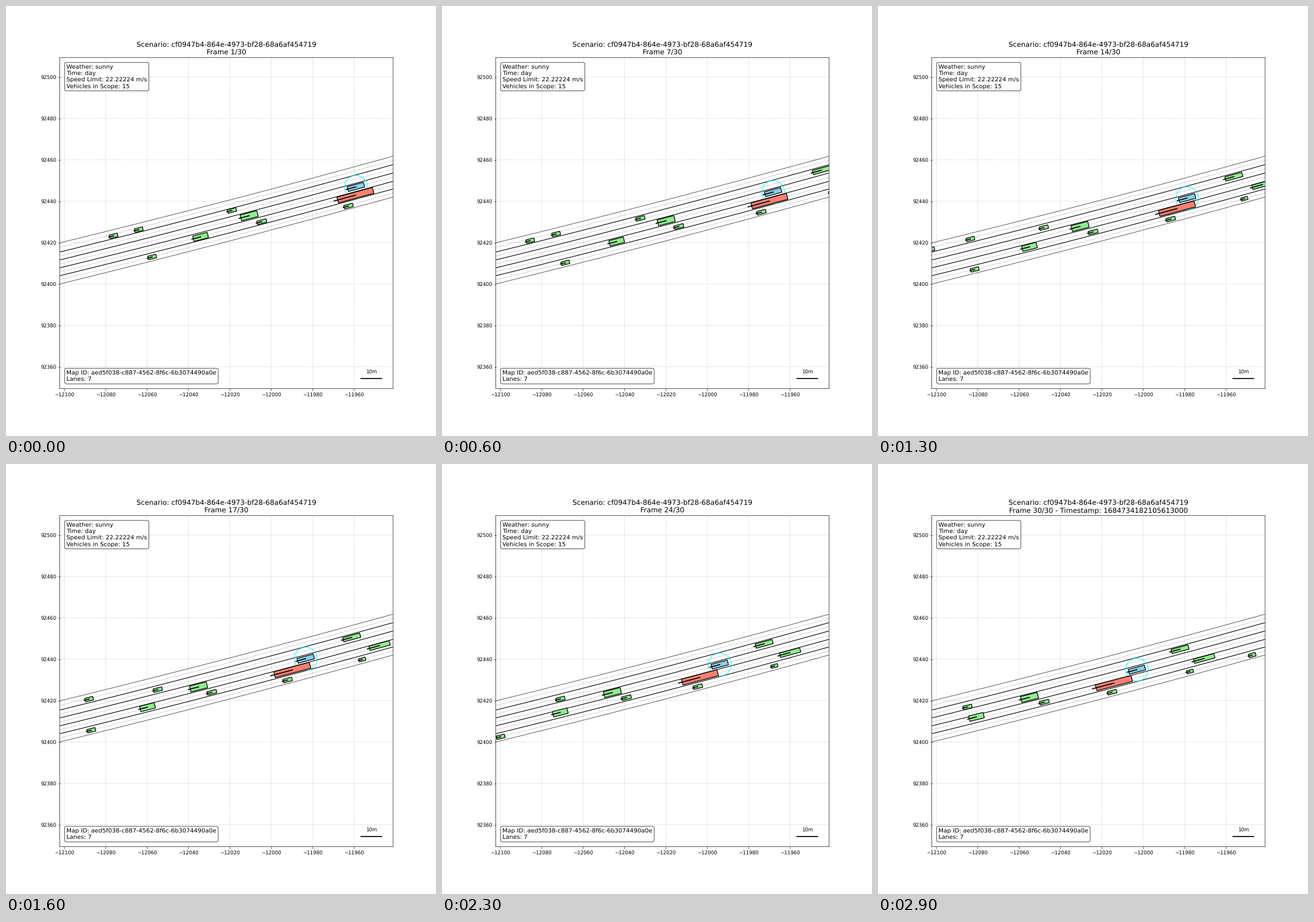
Recreate the animation shown at these times as a matplotlib script. Size 748 by 748 pixels, loop 3000 ms.

```python
import matplotlib.pyplot as plt
import numpy as np
from matplotlib.animation import FuncAnimation
from matplotlib.patches import Circle, Polygon

STAGE = 748
FRAMES = 30
X_MID, Y_MID, SPAN = -12021.7, 92429.4, 160.0
LEFT, RIGHT, TOP, BOTTOM = 0.125, 0.9, 0.88, 0.11
SCALE = STAGE * (TOP - BOTTOM) / SPAN      # pixels per metre
ROAD_X, ROAD_W = STAGE * LEFT, STAGE * (RIGHT - LEFT)

plt.rcParams.update({"font.family": "DejaVu Sans", "text.hinting": "none",
                     "path.snap": False})
fig, ax = plt.subplots(figsize=(12, 12), dpi=STAGE / 12)
fig.subplots_adjust(left=LEFT, right=RIGHT, top=TOP, bottom=BOTTOM)


def to_map(px, py):
    """Stage pixels (y down) to map metres."""
    cx = STAGE * (LEFT + RIGHT) / 2
    cy = STAGE * (1 - (TOP + BOTTOM) / 2)
    return X_MID + (px - cx) / SCALE, Y_MID - (py - cy) / SCALE


half_width = ROAD_W / SCALE / 2
ax.set_xlim(X_MID - half_width, X_MID + half_width)
ax.set_ylim(Y_MID - SPAN / 2, Y_MID + SPAN / 2)
ax.ticklabel_format(useOffset=False, style="plain")
ax.set_axisbelow(True)
ax.grid(True, linestyle="--", alpha=0.6)

# Heights of the lane borders at the left and right ends of the road
WEST = np.array([412, 428, 441.7, 455.5, 469.2, 483.5])
EAST = np.array([261.3, 276, 290.5, 305, 318.3, 332.3])
SAG = 9.2


def road_y(px, west, east):
    u = (px - ROAD_X) / ROAD_W
    return west + (east - west) * u + SAG * u * (1 - u)


def lane_y(px, lane):
    """Height at px; lane runs from 0 (upper edge) to 1 (lower edge)."""
    west, east = (e[0] + lane * (e[-1] - e[0]) for e in (WEST, EAST))
    return road_y(px, west, east)


def draw_road():
    px = ROAD_X + ROAD_W * np.linspace(-0.01, 1.01, 80)

    def line(west, east, **style):
        ax.plot(*to_map(px, road_y(px, west, east)), zorder=2, **style)

    line(WEST[0], EAST[0], color="black", lw=1, alpha=0.75)
    line(WEST[-1], EAST[-1], color="black", lw=1, alpha=0.75)
    for west, east in zip(WEST[1:-1], EAST[1:-1]):
        line(west, east, color="black", lw=1.3)
    for west, east in zip((WEST[1:] + WEST[:-1]) / 2, (EAST[1:] + EAST[:-1]) / 2):
        line(west, east, color="gray", lw=0.8, ls="--", alpha=0.7)


draw_road()

# In the upper lane, tracking steps ahead where its map section ends.
SECTION_END, SECTION_STEP, UPPER_LANE = 127, 23, 0.2


class Vehicle:
    """Drives west at a steady speed (pixels per frame) along a lane.

    drift is the lane change over one loop; wave = (pixels, half cycles)
    makes the vehicle run a little behind or ahead.
    """

    def __init__(self, start, speed, lane, length, width=6.2, drift=0,
                 wave=(0, 1), color="lightgreen", ring=0):
        self.start, self.speed = start, speed
        self.lane, self.drift, self.wave = lane, drift, wave
        self.length, self.width = length / SCALE, width / SCALE
        self.body = ax.add_patch(Polygon(np.zeros((4, 2)), fc=color, ec="black",
                                         lw=1.5, zorder=4))
        self.nose, = ax.plot([], [], color="black", lw=2, zorder=5)
        self.ring = ax.add_patch(Circle((0, 0), ring / SCALE, fill=False, ec="cyan",
                                        lw=1.6, alpha=0.7, zorder=3,
                                        visible=ring > 0))

    def position(self, frame):
        t = frame / (FRAMES - 1)
        size, cycles = self.wave
        px = self.start - self.speed * frame + size * np.sin(np.pi * cycles * t)
        if self.lane < UPPER_LANE and px < SECTION_END:
            px -= SECTION_STEP
        return px, self.lane + self.drift * t

    def update(self, frame):
        px, lane = self.position(frame)
        slope = (lane_y(px - 1, lane) - lane_y(px + 1, lane)) / 2
        ahead = -np.array([1, slope]) / np.hypot(1, slope)
        side = np.array([-ahead[1], ahead[0]])
        center = np.array(to_map(px, lane_y(px, lane)))
        f, s = ahead * self.length / 2, side * self.width / 2
        self.body.set_xy([center + f + s, center + f - s,
                          center - f - s, center - f + s])
        self.nose.set_data(*zip(center, center + 1.2 * f))
        self.ring.center = tuple(center)


vehicles = [
    Vehicle(187.2, 5.62, 0.153, 14.4),
    Vehicle(231, 5.4, 0.156, 14.4, drift=-0.04),
    Vehicle(393, 8.18, 0.27, 15.3, drift=0.093, wave=(2, 1)),
    Vehicle(423, 5.5, 0.509, 30, 10.4),
    Vehicle(338.5, 5.77, 0.717, 26, 9.6, drift=-0.058),
    Vehicle(445, 5.37, 0.736, 16.5, drift=-0.02, wave=(-1, 1)),
    Vehicle(254.3, 6.62, 0.905, 14.6),
    Vehicle(595.8, 6.5, 0.922, 15.8, drift=-0.02, wave=(-2, 1)),
    Vehicle(695, 5.85, 0.292, 30.5, 7.6),
    Vehicle(751.1, 6.33, 0.678, 36.5, 7.8),
    Vehicle(714.4, 5.92, 0.902, 11.6, 5.5),
    Vehicle(825, 6, 0.915, 12.3),
    Vehicle(607.8, 6.81, 0.702, 64, 10.6, drift=-0.01, wave=(2.6, 2),
            color="salmon"),
    Vehicle(608.7, 5.46, 0.502, 29.2, 8.6, drift=0.009, color="skyblue", ring=19.9),
]


def info(y, va, text):
    ax.text(0.02, y, text, transform=ax.transAxes, va=va, fontsize=12, zorder=6,
            bbox=dict(boxstyle="round", facecolor="white", alpha=0.8))


info(0.98, "top", "Weather: sunny\nTime: day\n"
     "Speed Limit: 22.22224 m/s\nVehicles in Scope: 15")
info(0.02, "bottom", "Map ID: aed5f038-c887-4562-8f6c-6b3074490a0e\nLanes: 7")

bar_x, bar_y = to_map(617.5, 648)
ax.plot([bar_x, bar_x + 10], [bar_y, bar_y], color="black", lw=2)
ax.text(*to_map(635.5, 639.3), "10m", ha="center", va="baseline", fontsize=10)

title = ax.set_title("", fontsize=14)


def draw(frame):
    text = ("Scenario: cf0947b4-864e-4973-bf28-68a6af454719\n"
            f"Frame {frame + 1}/{FRAMES}")
    if frame == FRAMES - 1:
        text += " - Timestamp: 1684734182105613000"
    title.set_text(text)
    for vehicle in vehicles:
        vehicle.update(frame)
    return []


anim = FuncAnimation(fig, draw, frames=FRAMES, interval=100, repeat=True,
                     repeat_delay=0, blit=False)
plt.show()
```
